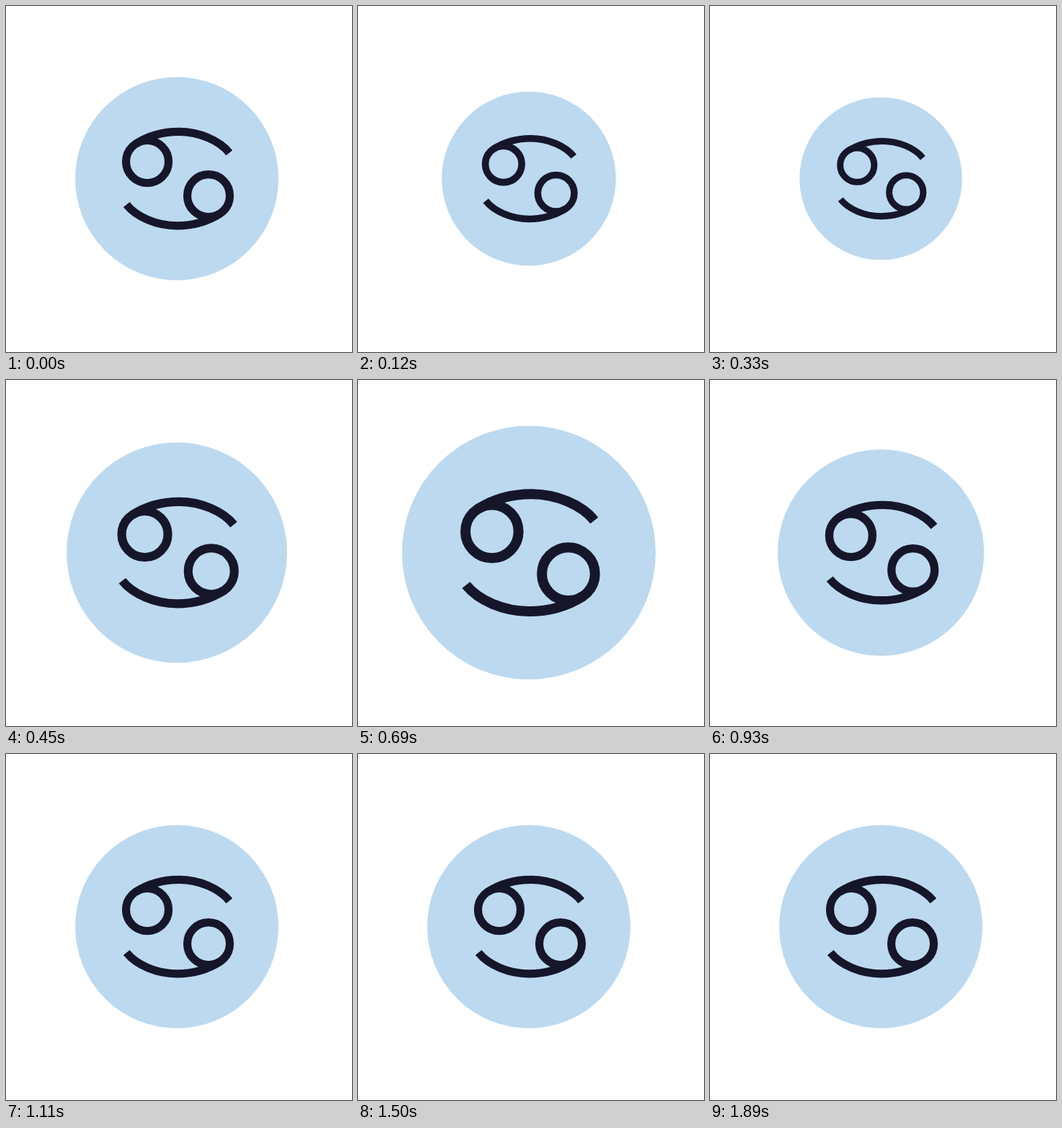
An HTML page for the animation above (2.1 s loop, 480x480 px).

```html
<!DOCTYPE html>
<html lang="en">
<head>
<meta charset="utf-8">
<title>Pulsing Cancer sign</title>
<style>
  html, body { margin: 0; width: 100%; height: 100%; overflow: hidden; background: #fff; }
  svg { display: block; width: 100%; height: 100%; }
</style>
</head>
<body>
<svg viewBox="0 0 480 480">
  <defs>
    <g id="half" fill="none" stroke="#16162b" stroke-width="11.2">
      <circle cx="196" cy="216" r="29.5"/>
      <path d="M180.2 191.2C196 181 217 174.4 240 174.4C268 174.4 296 186.5 309.8 203.7"/>
    </g>
  </defs>
  <g id="badge">
    <circle cx="237" cy="239.5" r="141" fill="#bdd9ef"/>
    <use href="#half"/>
    <use href="#half" transform="rotate(180 238.5 239.6)"/>
  </g>
</svg>
<script>
  const LOOP = 2100, STEP = 30;
  const CX = 237, CY = 239.5;
  // [time in ms, scale]
  const keys = [[0, 1], [350, 0.8], [700, 1.248], [1080, 1], [LOOP, 1]];
  const badge = document.getElementById('badge');
  const easeOut = x => 1 - (1 - x) ** 3;

  function scaleAt(t) {
    const i = keys.findIndex(([end]) => t < end);
    const [t0, s0] = keys[i - 1], [t1, s1] = keys[i];
    return s0 + (s1 - s0) * easeOut((t - t0) / (t1 - t0));
  }

  const start = performance.now();
  function draw() {
    const elapsed = (performance.now() - start) % LOOP;
    const s = scaleAt(Math.floor(elapsed / STEP) * STEP);
    badge.setAttribute('transform', `translate(${CX} ${CY}) scale(${s}) translate(${-CX} ${-CY})`);
    requestAnimationFrame(draw);
  }
  draw();
</script>
</body>
</html>
```
